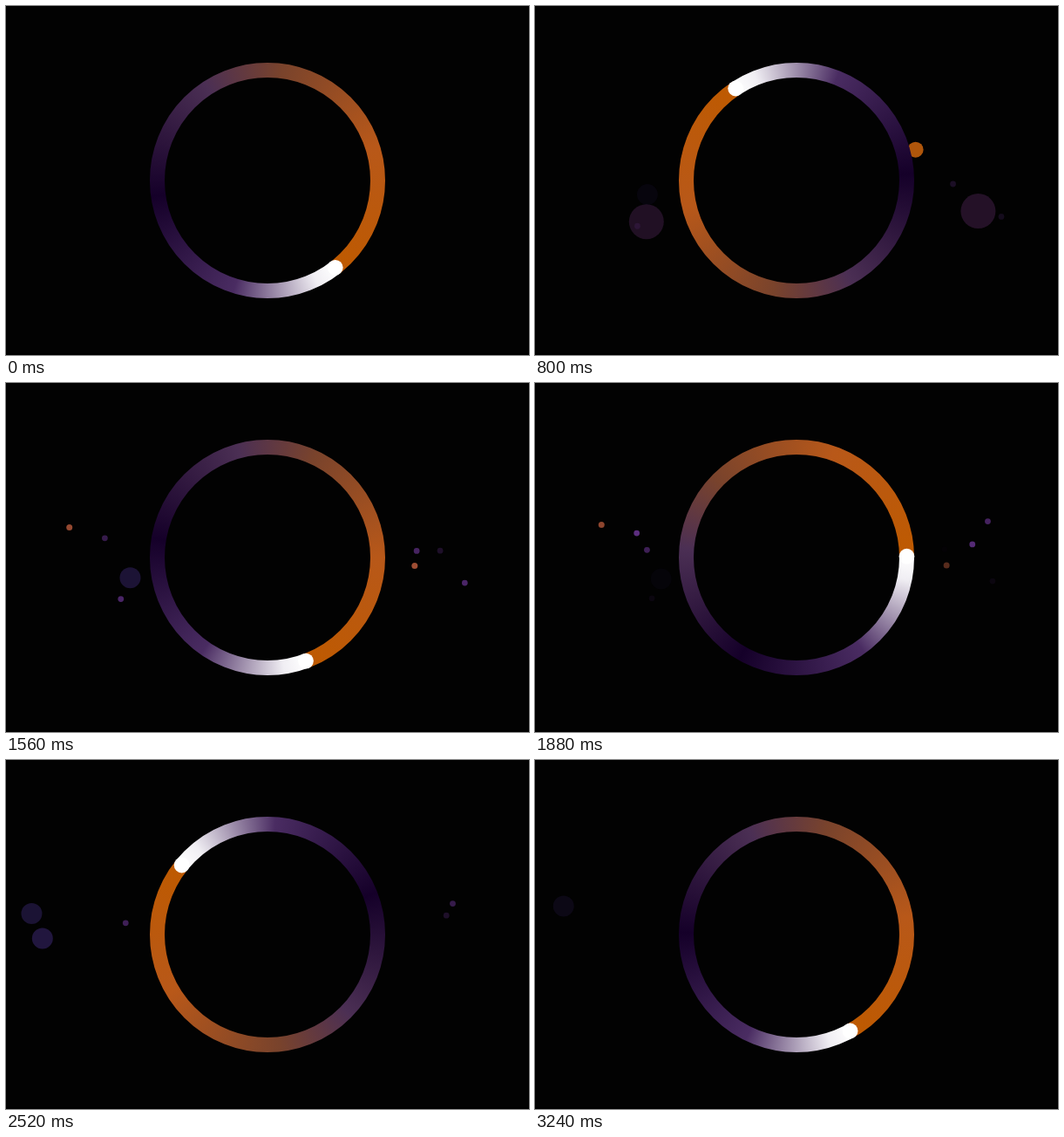
These frames come from a looping animation (600x400 px, 3.28 s). An HTML page with a canvas:

```html
<!DOCTYPE html>
<html>
<head>
<meta charset="utf-8">
<style>
html, body { margin: 0; width: 100%; height: 100%; overflow: hidden; background: #020202; }
canvas { display: block; }
</style>
</head>
<body>
<canvas id="stage" width="600" height="400"></canvas>
<script>
const ctx = document.getElementById('stage').getContext('2d');
const LOOP = 3280, STEP = 40;
const CX = 300, CY = 200, R = 126.5, TAU = Math.PI * 2;
const LIFE = 1200, DRAG = 600, REACH = 24;

// Degrees clockwise behind the head, and the colour there
const tail = {
  0: '#fff', 12: '#f0eef3', 55: '#4a2c62', 120: '#150029',
  185: '#4b2f54', 225: '#79432c', 290: '#b85819', 360: '#be5a00'
};

// Each spark: birth, x and y at mid-life, heading in degrees
const groups = [
  { color: '#27132a', r: 20, sparks: [[0, 129, 245, 118], [330, 509, 233, 286]] },
  { color: '#221740', r: 12, sparks: [[730, 140, 222, 28], [2000, 43, 204, 338], [2160, 31, 172, 291]] },
  { color: '#b85a0c', r: 9, sparks: [[80, 438, 165.5, 210]] },
  { color: '#a04e34', r: 3.5, sparks: [[900, 468, 209.5, 354], [1100, 74.5, 164, 320]] },
  { color: '#5c2e80', r: 3.4, sparks: [
    [690, 473, 195, 234], [720, 129, 248.5, 342], [720, 528, 231.5, 235], [1320, 117, 171.5, 300],
    [1440, 503, 182.5, 297], [1560, 515.5, 162, 139], [1600, 134, 188.5, 333]
  ] }
];

function disc(x, y, r, color) {
  ctx.fillStyle = color;
  ctx.beginPath();
  ctx.arc(x, y, r, 0, TAU);
  ctx.fill();
}

// Sparks fade in and out along half a sine while drag slows them down
function drawSpark(age, x, y, heading, r, color) {
  if (age <= 0 || age >= LIFE) return;
  const a = heading / 360 * TAU;
  const d = REACH * (Math.exp(-LIFE / 2 / DRAG) - Math.exp(-age / DRAG));
  ctx.globalAlpha = Math.sin(Math.PI * age / LIFE);
  disc(x + d * Math.cos(a), y + d * Math.sin(a), r, color);
  ctx.globalAlpha = 1;
}

// Two anticlockwise turns per loop
function drawRing(t) {
  const a = TAU * (52.1 / 360 - 2 * t / LOOP);
  const paint = ctx.createConicGradient(a, CX, CY);
  for (const deg in tail) paint.addColorStop(deg / 360, tail[deg]);
  ctx.strokeStyle = paint;
  ctx.lineWidth = 17;
  ctx.beginPath();
  ctx.arc(CX, CY, R, 0, TAU);
  ctx.stroke();
  disc(CX + R * Math.cos(a), CY + R * Math.sin(a), 8.9, '#fff');
}

function draw(now) {
  const t = Math.floor(now % LOOP / STEP) * STEP;
  ctx.fillStyle = '#020202';
  ctx.fillRect(0, 0, 600, 400);
  ctx.fillStyle = '#000';
  ctx.fillRect(0, 398, 600, 2);
  for (const { color, r, sparks } of groups)
    for (const [birth, x, y, heading] of sparks)
      drawSpark(t - birth, x, y, heading, r, color);
  drawRing(t);
}

const start = performance.now();
function tick() {
  draw(performance.now() - start);
  requestAnimationFrame(tick);
}
tick();
</script>
</body>
</html>
```
